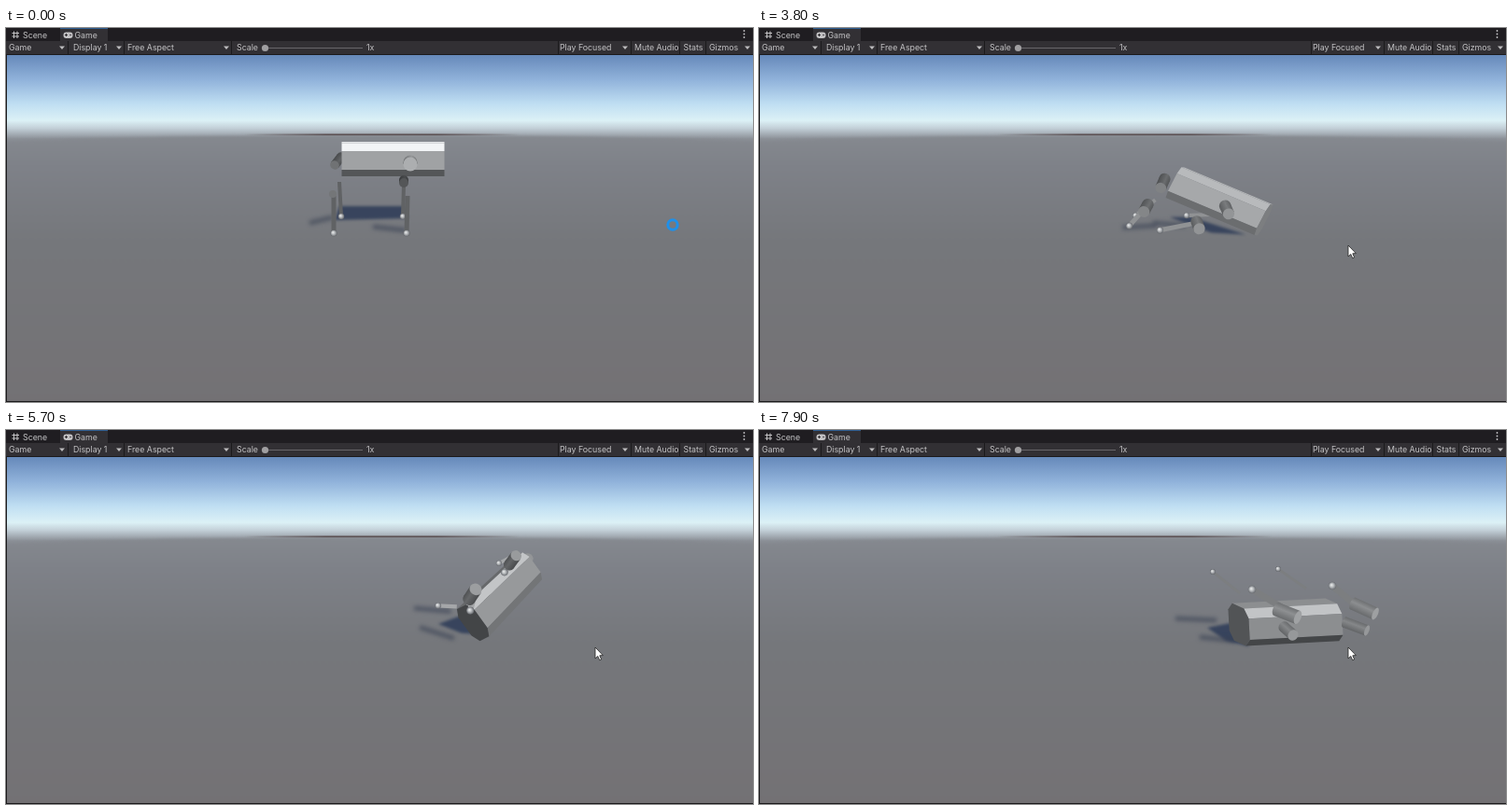
An HTML page with a canvas that plays this animation: 800 by 401 pixels, repeating every 8000 ms.

```html
<!DOCTYPE html>
<html>
<head>
<meta charset="utf-8">
<style>
html, body { margin: 0; width: 100%; height: 100%; overflow: hidden; background: #1f1d21; }
canvas { display: block; }
</style>
</head>
<body>
<canvas id="stage" width="800" height="401"></canvas>
<script>
const ctx = document.getElementById('stage').getContext('2d');
const LOOP = 8000, STEP = 100, CHAMFER = 0.57;

// body: centre, axis length/angle, up length/angle, facing vector, taper
// tones: top, upper chamfer, side, lower chamfer, bottom, left cap, right cap
// leg: hip, hip cap, knee, foot, hip radius, rod width, grey
const stand = {
  body: [414.5, 140.5, 55, 0, 17.7, -90, 0, 1.5, 0],
  tones: [228, 242, 160, 84, 64, 96, 112], side: 0.8, rod: 96,
  shadow: [357, 191, 426, 191, 431, 204, 352, 206],
  streaks: [[325, 209, 350, 203], [393, 213, 428, 217]],
  legs: [
    [359, 138, 352, 147, 357, 165, 359, 202, 5, 4, 112],
    [350, 178, 350, 178, 351, 180, 351, 220, 4, 5, 116],
    [433, 144, 433, 146, 426, 168, 425, 202, 7.5, 4, 172],
    [426, 163, 426, 166, 430, 180, 429, 220, 5, 5, 84]],
  behind: [0]
};
const fall = {
  body: [492, 193, 54.5, 6.9, 17, -83, -1, 3, 0],
  tones: [224, 218, 170, 120, 80, 96, 128], side: 0.9, rod: 140,
  shadow: [415, 205, 440, 205, 527, 221, 488, 224],
  streaks: [[385, 222, 420, 218], [440, 222, 470, 222]],
  legs: [
    [427, 177, 424, 201, 407, 200, 371, 201, 6, 4, 126],
    [404, 209, 401, 227, 398, 214, 363, 218, 6, 5, 130],
    [508, 197, 511, 211, 500, 203, 470, 200, 6, 4, 130],
    [477, 213, 480, 230, 472, 215, 433, 215, 6, 5, 130]],
  behind: []
};
const tilt = {
  body: [494.5, 177, 48, 42.5, 20.3, -38, -5, -4.5, 0],
  tones: [134, 142, 160, 92, 80, 80, 118], side: 0.6, rod: 150,
  shadow: [470, 200, 490, 200, 514, 222, 480, 214],
  streaks: [[395, 204, 432, 204], [400, 193, 440, 199]],
  legs: [
    [444, 142, 438, 135, 446, 165, 443, 201, 6, 4, 130],
    [432, 164, 426, 160, 432, 168, 438, 205, 6.5, 5, 134],
    [488, 182, 493, 185, 480, 196, 443, 202, 6.5, 4, 168],
    [458, 200, 461, 197, 457, 203, 425, 219, 6.5, 5, 166]],
  behind: [0]
};
const roll = {
  body: [514, 164, 38, -64, 19.2, -141, 6.5, -8, 0.12],
  tones: [86, 196, 156, 136, 70, 60, 90], side: 0.5, rod: 184,
  shadow: [455, 206, 480, 195, 512, 214, 482, 214],
  streaks: [[433, 186, 470, 190], [430, 207, 466, 222]],
  legs: [
    [492, 163, 492, 149, 468, 196, 452, 205, 5.5, 5, 150],
    [469, 177, 469, 157, 471, 178, 483, 204, 6.5, 6, 154],
    [517, 120, 517, 102, 517, 122, 515, 140, 5.5, 4, 146],
    [494, 126, 494, 106, 494, 126, 497, 146, 5.5, 5, 150]],
  behind: [0, 2]
};
const flip = {
  body: [564, 206, 50, -3, 20, -93, 11, 5, 0],
  tones: [140, 194, 140, 68, 60, 82, 90], side: 0.82, rod: 124,
  shadow: [480, 212, 505, 207, 525, 232, 500, 226],
  streaks: [[446, 202, 490, 204], [472, 222, 510, 226]],
  legs: [
    [562, 211, 572, 220, 515, 175, 486, 152, 6, 3, 150],
    [554, 192, 577, 201, 563, 192, 528, 171, 7.5, 7, 160],
    [627, 206, 651, 215, 586, 170, 556, 149, 6, 3, 150],
    [636, 186, 660, 197, 638, 187, 614, 167, 7, 7, 158]],
  behind: []
};
const TRACK = [
  { at: 1750, pose: stand }, { at: 2700, pose: fall, ease: 1.7 }, { at: 3100, pose: fall, ease: 1 },
  { at: 4400, pose: tilt, ease: 1.3 }, { at: 5200, pose: roll, ease: 1 }, { at: 6150, pose: flip, ease: 1.8 }
];

const clamp = v => Math.max(0, Math.min(1, v));
const grey = g => `rgb(${g},${g + 2},${g + 4})`;

function mix(a, b, k) {
  if (typeof a === 'number') return a + (b - a) * k;
  if (Array.isArray(a)) return a.map((v, i) => mix(v, b[i], k));
  const out = {};
  for (const key in a) out[key] = key === 'behind' ? (k < 0.5 ? a : b).behind : mix(a[key], b[key], k);
  return out;
}

function poseAt(t) {
  let i = 1;
  while (i < TRACK.length - 1 && t > TRACK[i].at) i++;
  const from = TRACK[i - 1], to = TRACK[i];
  const pose = mix(from.pose, to.pose, clamp((t - from.at) / (to.at - from.at)) ** to.ease);
  // upturned legs keep paddling after the tumble
  const s = clamp((t - 5900) / 300) * (0.5 - 0.5 * Math.cos((t - 7900) / 810 * 2 * Math.PI));
  pose.legs.forEach((leg, n) => {
    leg[6] += s * (n % 2 ? 16 : 6);
    leg[7] -= s * (n % 2 ? 32 : 27);
    leg[5] -= s * (n % 2 ? 6 : 10);
  });
  return pose;
}

function poly(points, fill) {
  ctx.beginPath();
  points.forEach(p => ctx.lineTo(p[0], p[1]));
  ctx.closePath();
  ctx.fillStyle = fill;
  ctx.fill();
}

function line(x1, y1, x2, y2, width, stroke) {
  ctx.beginPath();
  ctx.moveTo(x1, y1);
  ctx.lineTo(x2, y2);
  ctx.lineWidth = width;
  ctx.strokeStyle = stroke;
  ctx.stroke();
}

function disc(x, y, rx, ry, angle, fill) {
  ctx.beginPath();
  ctx.ellipse(x, y, rx, ry, angle, 0, 7);
  ctx.fillStyle = fill;
  ctx.fill();
}

function ramp(x1, y1, x2, y2, stops) {
  const g = ctx.createLinearGradient(x1, y1, x2, y2);
  stops.forEach(([at, color]) => g.addColorStop(at, color));
  return g;
}

function scene() {
  ctx.fillStyle = ramp(0, 29, 0, 119, [[0, '#6689ba'], [0.3, '#91b3db'], [0.58, '#bfdef2'],
    [0.78, '#dcf1f6'], [0.87, '#c3d0d8'], [1, '#8b9097']]);
  ctx.fillRect(0, 28, 800, 100);
  ctx.filter = 'blur(1.5px)';
  ctx.beginPath();
  ctx.moveTo(-9, 121);
  ctx.quadraticCurveTo(400, 109, 809, 121);
  ctx.lineTo(809, 420);
  ctx.lineTo(-9, 420);
  ctx.fillStyle = ramp(0, 114, 0, 400, [[0, '#85898f'], [0.12, '#7e8188'], [0.4, '#75777b'], [1, '#737174']]);
  ctx.fill();
  ctx.filter = 'none';
  ctx.fillStyle = ramp(255, 0, 550, 0, [[0, '#5b505200'], [0.3, '#5b5052'], [0.7, '#5b5052'], [1, '#5b505200']]);
  ctx.fillRect(255, 113.5, 295, 1.7);
}

function shadows({ shadow, streaks }) {
  const pts = [0, 2, 4, 6].map(i => shadow.slice(i, i + 2));
  ctx.filter = 'blur(1.5px)';
  poly(pts, 'rgba(45,59,88,.85)');
  ctx.filter = 'blur(2px)';
  streaks.forEach(s => line(...s, 5, 'rgba(58,66,84,.6)'));
  ctx.filter = 'none';
}

function prism({ body, tones }) {
  const [cx, cy, aLen, aDir, uLen, uDir, vx, vy, taper] = body;
  const polar = (r, deg) => [r * Math.cos(deg * Math.PI / 180), r * Math.sin(deg * Math.PI / 180)];
  const [ax, ay] = polar(aLen, aDir), [ux, uy] = polar(uLen, uDir), k = CHAMFER;
  const ring = [[1, -k], [1, k], [k, 1], [-k, 1], [-1, k], [-1, -k], [-k, -1], [k, -1]];
  const end = s => ring.map(([u, v]) => [
    cx + s * ax + (u * ux + v * vx) * (1 - s * taper),
    cy + s * ay + (u * uy + v * vy) * (1 - s * taper)]);
  const left = end(-1), right = end(1);
  for (let j = 0; j < 5; j++) {
    const [p, q, r] = [left[j], right[j], right[j + 1]];
    const facing = (q[0] - p[0]) * (r[1] - q[1]) - (q[1] - p[1]) * (r[0] - q[0]);
    if (facing > 0) poly([p, q, r, left[j + 1]], grey(tones[j]));
  }
  const turn = ux * vy - uy * vx;
  if (turn > 1) poly(left, grey(tones[5]));
  if (turn < -1) poly(right, grey(tones[6]));
}

function rod([, , , , kx, ky, fx, fy, , width], tone) {
  line(kx, ky, fx, fy, width, grey(tone));
  const r = 1.8 + 0.36 * width;
  const shine = ctx.createRadialGradient(fx - 1, fy - 1, 0, fx, fy, r);
  shine.addColorStop(0, '#f0f1f1');
  shine.addColorStop(0.5, '#b4b7ba');
  shine.addColorStop(1, '#64676c');
  disc(fx, fy, r, r, 0, shine);
}

function hip([hx, hy, cx, cy, , , , , r, , tone], side) {
  const dx = cx - hx, dy = cy - hy, len = Math.hypot(dx, dy) || 0.01;
  const squash = Math.max(0.4, Math.sqrt(Math.max(0, 1 - (len / 28) ** 2)));
  const nx = -dy / len * r, ny = dx / len * r, dir = Math.atan2(dy, dx);
  const skin = ramp(hx - nx, hy - ny, hx + nx, hy + ny,
    [[0, grey(tone * side * 0.85)], [0.4, grey(tone * side * 1.08)], [1, grey(tone * side * 0.8)]]);
  disc(hx, hy, r * squash, r, dir, skin);
  line(hx, hy, cx, cy, 2 * r, skin);
  disc(cx, cy, r * squash, r, dir, grey(tone));
}

function robot(pose) {
  shadows(pose);
  const { legs, behind, side } = pose;
  [0, 2].forEach(n => rod(legs[n], pose.rod));
  behind.forEach(n => hip(legs[n], side));
  prism(pose);
  [0, 2, 1, 3].forEach(n => {
    if (n % 2) rod(legs[n], pose.rod);
    if (!behind.includes(n)) hip(legs[n], side);
  });
}

function label(text, x, y) {
  ctx.fillStyle = '#c3c2c4';
  ctx.fillText(text, x, y);
}

function toolbar() {
  ctx.fillStyle = '#1f1d21';
  ctx.fillRect(0, 0, 800, 14);
  ctx.fillStyle = '#323034';
  ctx.fillRect(0, 14, 800, 14);
  ctx.fillRect(58, 0, 51, 14);
  ctx.fillStyle = '#2f5d91';
  ctx.fillRect(58, 0, 51, 1);
  ctx.fillStyle = '#1b1a1c';
  ctx.fillRect(0, 28, 800, 1);
  [66, 126, 241, 591, 669, 721, 749].forEach(x => ctx.fillRect(x, 14, 1, 14));
  ctx.fillRect(0, 28, 1, 373);
  ctx.fillRect(0, 400, 800, 1);

  ctx.font = '8.8px Inter, sans-serif';
  ctx.textBaseline = 'middle';
  label('Scene', 18, 8);
  label('Game', 73.5, 8);
  [['Game', 3], ['Display 1', 72], ['Free Aspect', 130], ['Scale', 247], ['1x', 386], ['Play Focused', 593],
    ['Mute Audio', 673], ['Stats', 725.5], ['Gizmos', 753]].forEach(([text, x]) => label(text, x, 21.5));
  [60, 121, 236, 663, 794].forEach(x => poly([[x - 3, 19.5], [x + 3, 19.5], [x, 23]], '#bdbcbe'));

  line(280, 21.5, 382, 21.5, 1, '#68666a');
  disc(277.5, 21.5, 3.6, 3.6, 0, '#a09fa1');
  [8.5, 12].forEach(x => line(x, 3.5, x, 11, 1, '#c3c2c4'));
  [5.5, 9].forEach(y => line(6.5, y, 14, y, 1, '#c3c2c4'));
  ctx.beginPath();
  ctx.roundRect(61.5, 4.5, 10, 6.5, 3);
  ctx.fillStyle = '#c3c2c4';
  ctx.fill();
  line(63, 7.5, 66, 7.5, 1, '#323034');
  line(64.5, 6, 64.5, 9, 1, '#323034');
  disc(69, 7.5, 0.8, 0.8, 0, '#323034');
  [3, 6.5, 10].forEach(y => disc(790.5, y, 0.9, 0.9, 0, '#c3c2c4'));
}

function pointer(t) {
  if (t < 100) {
    ctx.beginPath();
    ctx.arc(714, 211, 5.2, 0, 7);
    ctx.lineWidth = 3;
    ctx.strokeStyle = '#1e90ea';
    ctx.stroke();
    return;
  }
  const tip = [[0, 0], [0, 12], [2.8, 9.5], [4.7, 13.8], [6.6, 13], [4.8, 8.8], [8.3, 8.6]];
  poly(tip.map(([x, y]) => [631 + x, 233 + y]), '#fff');
  ctx.lineWidth = 0.8;
  ctx.strokeStyle = '#222';
  ctx.stroke();
}

function frame(now) {
  const t = Math.floor(now % LOOP / STEP) * STEP;
  scene();
  robot(poseAt(t));
  toolbar();
  pointer(t);
  requestAnimationFrame(frame);
}
requestAnimationFrame(frame);
</script>
</body>
</html>
```
